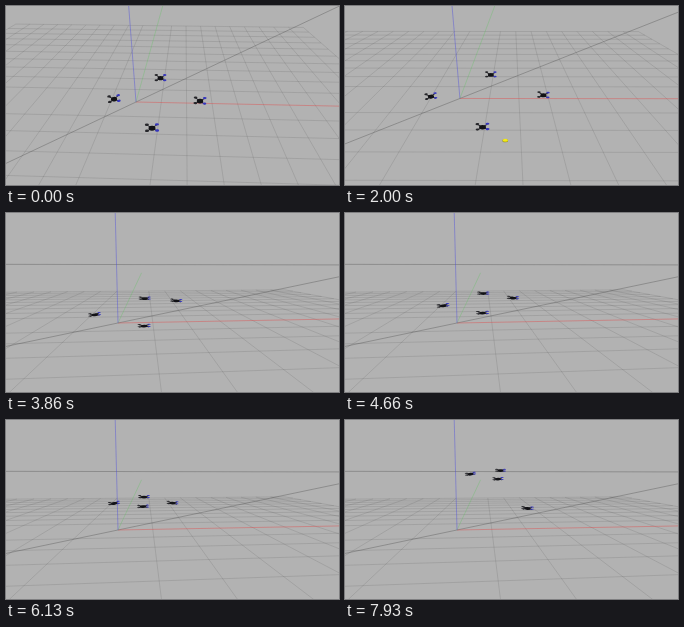
Write an HTML page with a canvas that moves like this. It is 333 px wide and 179 px high and loops after 8 s.

```html
<!DOCTYPE html>
<html lang="en">
<head>
<meta charset="utf-8">
<title>Drone formation</title>
<style>
html, body { margin: 0; width: 100%; height: 100%; overflow: hidden; background: #b2b2b2; }
canvas { display: block; width: 333px; height: 179px; }
</style>
</head>
<body>
<canvas id="stage" width="333" height="179"></canvas>
<script>
const ctx = document.getElementById('stage').getContext('2d');
const W = 333, H = 179, CX = W / 2, CY = H / 2, FOCAL = 288;
const LOOP = 8000, RAD = Math.PI / 180;

// camera orbit: start, midway, settled
const ORBIT = [1200, 1980, 2800];
const poses = [
  { ox: 130, oy: 96, pitch: 30.7, yaw: 2.2, depth: 11.4 },
  { ox: 115, oy: 92, pitch: 25.8, yaw: 0.3, depth: 9.8 },
  { ox: 112, oy: 110, pitch: 7.55, yaw: -5.3, depth: 8.3 }
];

const linear = k => k;
const easeOut = k => k * (2 - k);
const easeInOut = k => k * k * (3 - 2 * k);

// screen points: three during the orbit, then gathered, then flown away
const drones = [
  { tilt: -0.13, ease: easeInOut, path: [[108, 93], [86, 90], [82, 108], [108, 83.3], [125.5, 54]] },
  { tilt: 0, ease: easeOut, path: [[154.5, 72], [146, 68], [139.5, 96], [138, 77], [155.5, 50.5]] },
  { tilt: 0.05, ease: easeOut, path: [[194, 95], [199, 89], [175, 93.5], [166.5, 83], [182.5, 88.3]] },
  { tilt: -0.03, ease: easeInOut, path: [[146, 122], [137.5, 121], [138.5, 122], [137, 86.5], [153, 59]] }
];
const marker = [[163, 133], [161, 134], [134, 139]];

const mix = (a, b, k) => a + (b - a) * k;
const mixPoint = (p, q, k) => p.map((v, i) => mix(v, q[i], k));
const progress = (t, from, to) => Math.min(1, Math.max(0, (t - from) / (to - from)));

// segment index and fraction of the orbit
function orbitAt(t) {
  const i = t < ORBIT[1] ? 0 : 1;
  return [i, progress(t, ORBIT[i], ORBIT[i + 1])];
}

function poseAt(t) {
  const [i, k] = orbitAt(t), pose = {};
  for (const key in poses[i]) pose[key] = mix(poses[i][key], poses[i + 1][key], k);
  return pose;
}

function orbitPoint(points, t) {
  const [i, k] = orbitAt(t);
  return mixPoint(points[i], points[i + 1], k);
}

function dronePoint({ path, ease }, t) {
  if (t < ORBIT[2]) return orbitPoint(path, t);
  if (t < 6300) return mixPoint(path[2], path[3], ease(progress(t, ORBIT[2], 6000)));
  return mixPoint(path[3], path[4], linear(progress(t, 6300, 7930)));
}

function makeView({ ox, oy, pitch, yaw, depth }) {
  const sp = Math.sin(pitch * RAD), cp = Math.cos(pitch * RAD);
  const sy = Math.sin(yaw * RAD), cy = Math.cos(yaw * RAD);
  const o = [(ox - CX) * depth / FOCAL, (oy - CY) * depth / FOCAL, depth];
  return {
    sp,
    horizon: CY - FOCAL * sp / cp,
    place([x, y, z]) {
      const right = x * cy + y * sy, ahead = y * cy - x * sy;
      return [o[0] + right, o[1] - ahead * sp - z * cp, o[2] + ahead * cp - z * sp];
    }
  };
}

function addLine(view, from, to) {
  const NEAR = 0.1;
  let a = view.place(from), b = view.place(to);
  if (a[2] < NEAR && b[2] < NEAR) return;
  const clip = (p, q) => mixPoint(p, q, (NEAR - p[2]) / (q[2] - p[2]));
  if (a[2] < NEAR) a = clip(a, b);
  if (b[2] < NEAR) b = clip(b, a);
  ctx.moveTo(CX + FOCAL * a[0] / a[2], CY + FOCAL * a[1] / a[2]);
  ctx.lineTo(CX + FOCAL * b[0] / b[2], CY + FOCAL * b[1] / b[2]);
}

function stroke(color, width, build) {
  ctx.strokeStyle = color;
  ctx.lineWidth = width;
  ctx.beginPath();
  build();
  ctx.stroke();
}

function drawGround(view) {
  const origin = [0, 0, 0];
  stroke('rgba(75,75,75,0.27)', 0.6, () => {
    for (let i = -10; i <= 10; i++) {
      if (!i) continue;
      addLine(view, [i, -10, 0], [i, 10, 0]);
      addLine(view, [-10, i, 0], [10, i, 0]);
    }
  });
  const a = 43.2 * RAD, dx = 400 * Math.sin(a), dy = 400 * Math.cos(a);
  stroke('rgba(60,60,60,0.45)', 0.7, () => {
    addLine(view, [-dx, -dy, 0], [dx, dy, 0]);
    ctx.moveTo(0, view.horizon);
    ctx.lineTo(W, view.horizon + 0.6);
  });
  stroke('rgba(225,70,70,0.55)', 0.75, () => addLine(view, origin, [50, 0, 0]));
  stroke('rgba(85,195,85,0.45)', 0.65, () => addLine(view, origin, [0, 50, 0]));
  stroke('rgba(80,80,220,0.6)', 0.75, () => addLine(view, origin, [0, 0, 30]));
}

function ellipse(color, x, y, rx, ry) {
  ctx.fillStyle = color;
  ctx.beginPath();
  ctx.ellipse(x, y, rx, ry, 0, 0, 7);
  ctx.fill();
}

function drawDrone([x, y], tilt, flat, spin) {
  const w = 8.5 + y * 0.045;
  const dx = w * 0.36, dy = w * flat * 0.36, blade = w * (0.145 + 0.015 * spin);
  ctx.save();
  ctx.translate(x, y);
  ctx.rotate(tilt);
  stroke('#1b1b20', 0.9, () => {
    for (const s of [-1, 1]) {
      ctx.moveTo(-dx, -dy * s);
      ctx.lineTo(dx, dy * s);
    }
  });
  for (const sx of [-1, 1]) {
    for (const sy of [-1, 1]) {
      ellipse(sx > 0 ? '#3636bd' : '#26262a', sx * dx, sy * dy - 0.4, blade, Math.max(0.5, blade * flat));
    }
  }
  ellipse('#121216', 0, 0.2, w * 0.25, Math.max(1.4, w * flat * 0.3));
  ctx.restore();
}

function draw(t) {
  const view = makeView(poseAt(t));
  ctx.fillStyle = '#b2b2b2';
  ctx.fillRect(0, 0, W, H);
  drawGround(view);
  if (t >= ORBIT[0] && t < 2925) {
    const [x, y] = orbitPoint(marker, t);
    ellipse('#8d8720', x, y + 0.5, 2.9, 1.7);
    ellipse('#f3ea18', x, y, 2.7, 1.5);
  }
  const spin = t < 330 ? 0 : Math.sin(t / 20);
  for (const d of drones) drawDrone(dronePoint(d, t), d.tilt, view.sp + 0.1, spin);
}

const start = performance.now();
function frame() {
  draw((performance.now() - start) % LOOP);
  requestAnimationFrame(frame);
}
frame();
</script>
</body>
</html>
```
